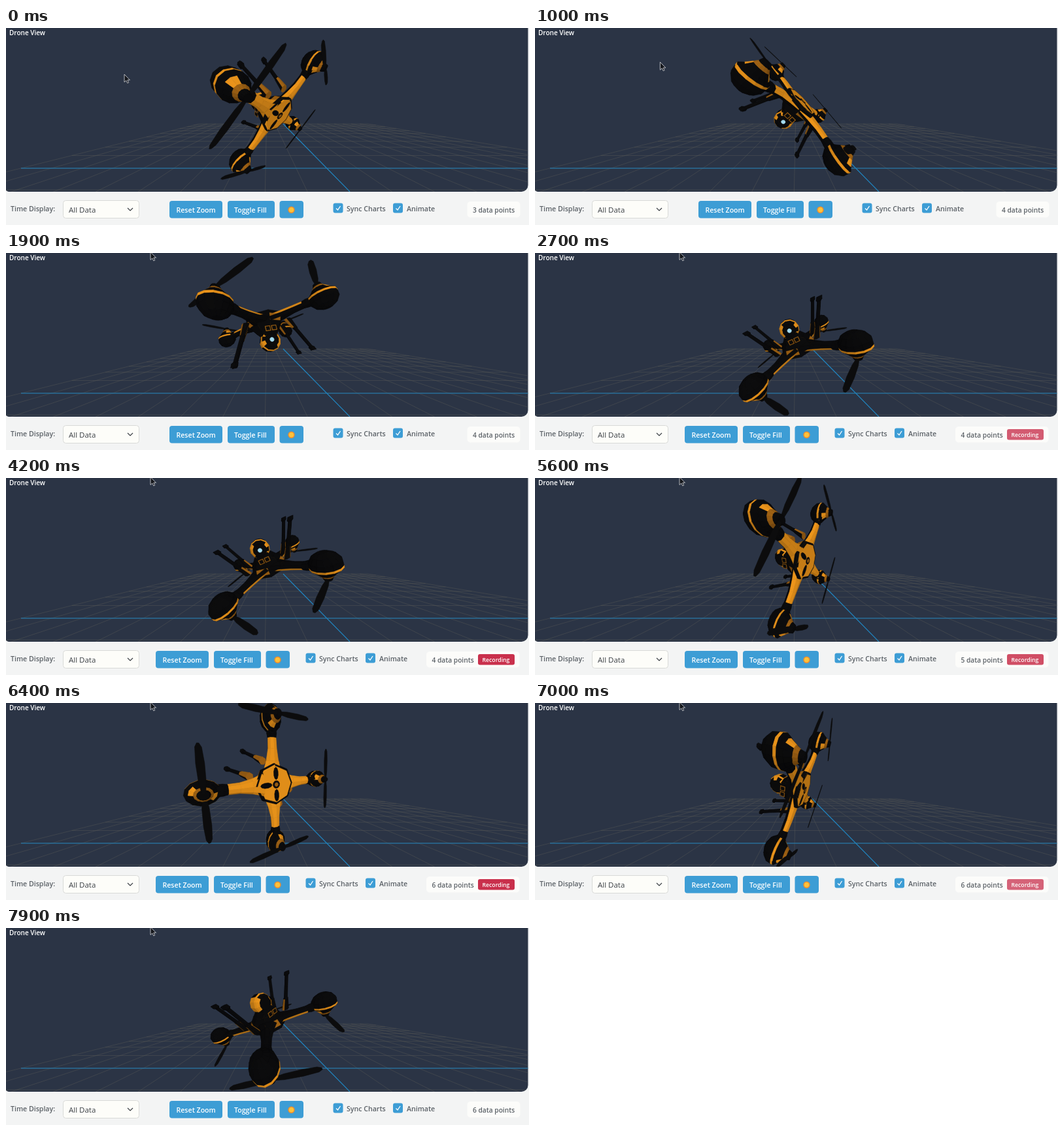
Write an HTML page with a canvas that moves like this. It is 800 px wide and 302 px high and loops after 8000 ms.

```html
<!DOCTYPE html>
<html lang="en">
<head>
<meta charset="utf-8">
<title>Drone View</title>
<style>
  html, body { margin: 0; width: 100%; height: 100%; overflow: hidden; background: #f3f4f4; }
  svg, canvas { position: absolute; left: 0; top: 0; width: 800px; height: 302px; display: block; }
  text { font-family: "Open Sans", "Noto Sans", sans-serif; font-size: 10.6px; font-weight: 600; fill: #5b6167; }
  .bold { fill: #fff; }
  .button { fill: #3d9dd5; }
  .tick { fill: none; stroke: #fff; stroke-width: 1.3; }
</style>
</head>
<body>
<svg viewBox="0 0 800 302">
  <defs>
    <clipPath id="view"><path d="M0 0H798.500V241a10 10 0 0 1-10 10H4a8 8 0 0 1-4-2z"/></clipPath>
  </defs>
  <rect width="800" height="302" fill="#f3f4f4"/>
  <g clip-path="url(#view)">
    <rect width="800" height="252" fill="#2b3445"/>
    <path id="grid" fill="none" stroke="#5d5c58" stroke-width=".8" opacity=".5"/>
    <path d="M23 215H799M424 147L526 251" fill="none" stroke="#1f82bd" stroke-width="1.2"/>
  </g>
  <text class="bold" x="5" y="10.5" style="font-size:10px">Drone View</text>

  <text x="7" y="281">Time Display:</text>
  <rect x="87.5" y="264.5" width="116" height="27" rx="4" fill="#fdfdf9" stroke="#d9dad8"/>
  <text x="96" y="282.5" style="font-size:11.5px;font-weight:500;fill:#3c4146">All Data</text>
  <path d="M186 276l4 4 4-4" fill="none" stroke="#3c4146" stroke-width="1.2"/>

  <g id="buttons">
    <rect class="button" x="250" y="265" width="81" height="26.500" rx="4"/>
    <text class="bold" x="260.500" y="282.500">Reset Zoom</text>
    <rect class="button" x="339" y="265" width="72" height="26.500" rx="4"/>
    <text class="bold" x="349" y="282.500">Toggle Fill</text>
    <rect class="button" x="418.500" y="265" width="36.500" height="26.500" rx="4"/>
    <circle cx="436.500" cy="278.800" r="4.500" fill="#ffc23a" stroke="#f08c2e" stroke-width="1.400"/>
  </g>
  <g id="checks">
    <rect class="button" x="500.500" y="268.500" width="15" height="15" rx="3"/>
    <path class="tick" d="M505 276.500l2.500 2.500 4-6"/>
    <text x="521" y="280.500">Sync Charts</text>
    <rect class="button" x="592" y="268.500" width="15" height="15" rx="3"/>
    <path class="tick" d="M596.500 276.500l2.500 2.500 4-6"/>
    <text x="613" y="280.500">Animate</text>
  </g>
  <rect id="box" y="266" height="24.500" rx="5" fill="#fcfcfa"/>
  <text id="count" y="282.500" style="font-size:10.2px"></text>
  <g id="badge">
    <rect x="722" y="270" width="56" height="16.500" rx="3" fill="#c9304c"/>
    <text class="bold" x="728.500" y="281.500" style="font-size:8.7px">Recording</text>
  </g>
  <path id="pointer" d="M0 0V12L2.800 9.500 4.800 13.500 6.700 12.600 4.800 8.800H8.500Z"
        fill="#15171c" stroke="#d8dbe0" stroke-width=".8"/>
</svg>
<canvas id="drone"></canvas>

<script>
const $ = id => document.getElementById(id);
const TAU = Math.PI * 2, LOOP = 8000, CAMERA = 200, REACH = 98;
const ORANGE = [238, 150, 27], BLACK = [12, 12, 13], TRIM = [160, 98, 20], GLINT = [165, 220, 240];

const combine = (a, b, k) => a.map((v, i) => v + b[i] * k);
const dot = (a, b) => a.reduce((s, v, i) => s + v * b[i], 0);
const cross = (a, b) => [a[1] * b[2] - a[2] * b[1], a[2] * b[0] - a[0] * b[2], a[0] * b[1] - a[1] * b[0]];
const unit = a => a.map(v => v / (Math.hypot(...a) || 1));
const ease = x => { x = Math.min(1, Math.max(0, x)); return x * x * (3 - 2 * x); };

// ---- floor grid ----
function floorPath() {
  const vx = 399, vy = 121, q0 = 94, cx = 490.7, half = 468;
  const atX = (x, q) => vx + (x - vx) * q / q0;
  let d = '';
  for (let k = -10; k <= 10; k++) {
    const x = cx + half * k / 10;
    d += `M${atX(x, 26)} ${vy + 26}L${atX(x, 131)} ${vy + 131}`;
    const depth = 1 + .2615 * k;
    if (depth < .7) continue;
    const q = q0 / depth;
    d += `M${atX(cx - half, q)} ${vy + q}L${atX(cx + half, q)} ${vy + q}`;
  }
  return d;
}
$('grid').setAttribute('d', floorPath());

// ---- drone mesh ----
const faces = [];
const UP = [0, 0, 1];

function frame(angle) {
  const out = [Math.cos(angle), Math.sin(angle), 0];
  const side = [-out[1], out[0], 0];
  const at = (r, t, c) => [out[0] * r + side[0] * t, out[1] * r + side[1] * t, c];
  return { out, side, at };
}

// Rings are [centre, radius along e1, radius along e2].
function loft(rings, e1, e2, sides, paint) {
  const loops = rings.map(([p, r1, r2 = r1]) => Array.from({ length: sides }, (_, j) => {
    const a = TAU * j / sides;
    return combine(combine(p, e1, r1 * Math.cos(a)), e2, r2 * Math.sin(a));
  }));
  for (let i = 0; i < loops.length - 1; i++)
    for (let j = 0; j < sides; j++) {
      const k = (j + 1) % sides;
      faces.push({ pts: [loops[i][j], loops[i][k], loops[i + 1][k], loops[i + 1][j]], color: paint(i, j), bias: 0 });
    }
  faces.push({ pts: loops[loops.length - 1], color: paint(loops.length - 2, 0), bias: 0 });
  faces.push({ pts: [...loops[0]].reverse(), color: paint(0, 0), bias: 0 });
}

const decal = (pts, color, bias = 4, extra = {}) => faces.push({ pts, color, bias, ...extra });
const disc = (place, r1, r2 = r1, n = 10, from = 0) => Array.from({ length: n }, (_, j) =>
  place(r1 * Math.cos(from + TAU * j / n), r2 * Math.sin(from + TAU * j / n)));

function addArm(index) {
  const { out, side, at } = frame(index * TAU / 4);
  loft([[at(18, 0, -1), 17, 7], [at(36, 0, 0), 11, 7], [at(54, 0, 1), 7.5, 6], [at(70, 0, 1), 7, 5.5],
    [at(76, 0, 1), 8, 6.5], [at(88, 0, 0), 8, 7]],
    side, UP, 8, (i, j) => j < 4 && i < 3 ? ORANGE : BLACK);

  // Motor pod: a dark bowl with a trim line, under a striped cone.
  const bowl = [[-17, 5], [-13, 11], [-6, 15], [1, 15.5], [4, 15.5], [8, 12], [14, 8], [18, 5.5], [23, 4]];
  loft(bowl.map(([c, r]) => [at(REACH, 0, c), r * 1.25, r]), out, side, 14,
    (i, j) => i === 3 || i === 5 && j % 7 < 2 ? ORANGE : i === 6 ? TRIM : BLACK);

  const blade = [[2, 1.8], [14, 3.5], [34, 4], [50, 3], [54, 1]];
  for (const dir of [1, -1]) {
    const edge = s => blade.map(([len, wide]) => at(REACH + wide * s, len * dir, 22));
    decal([...edge(1), ...edge(-1).reverse()], BLACK, 2, { double: true });
  }
  decal(disc((x, y) => at(17 + x, y, 9), 9.5, 4), BLACK, 9);
}

function addBody() {
  const { out, side, at } = frame(TAU / 8);
  loft([[at(5, 0, -28), 13], [at(3, 0, -18), 21], [at(0, 0, -8), 28], [at(0, 0, 2), 32], [at(0, 0, 6), 32], [at(0, 0, 8), 31]],
    out, side, 8, (i, j) => i === 2 && j % 2 ? TRIM : BLACK);
  decal(disc((x, y) => at(x, y, 8.5), 28, 28, 8), ORANGE, 6);
  decal(disc((x, y) => at(x, y, 9), 6), BLACK, 9);
  decal(disc((x, y) => at(x, y, 9.5), 3), TRIM, 10);

  const square = (s, size, r) => disc((x, y) => at(r, s + x, -20 + y), size, size, 4, TAU / 8);
  for (const s of [-5, 5]) {
    decal(square(s, 5.5, 24), TRIM, 6);
    decal(square(s, 3.8, 24.2), BLACK, 7);
  }

  const onSide = j => (j + 1) % 6 < 3;
  loft([[at(-9, 0, -36), 11], [at(-5, 0, -36), 15.5], [at(8, 0, -36), 16.5], [at(11, 0, -36), 15], [at(15, 0, -36), 11]],
    side, UP, 12, (i, j) => i === 2 || i > 0 && onSide(j) && j ? ORANGE : BLACK);
  decal(disc((x, y) => at(15.2, x, -36 + y), 10.5), BLACK, 7);
  decal(disc((x, y) => at(15.5, x, -36 + y), 3.4), GLINT, 8, { glint: true });

  for (const f of [-1, 1])
    for (const s of [-1, 1]) {
      const along = k => at(f * (16 + 6 * k), s * (36 + 24 * k), -6 - 58 * k);
      loft([[along(0), 6], [along(.3), 4], [along(.34), 3], [along(.9), 2.6], [along(.93), 4.5], [along(1), 4]],
        side, out, 7, (i, j) => i === 0 && j % 3 === 0 ? TRIM : BLACK);
    }
}
for (let i = 0; i < 4; i++) addArm(i);
addBody();

// ---- poses: time, centre, scale, then two neighbouring arm directions ----
const poses = [
  [0, 413, 130, .95, [-.59, .80, -.04], [-.40, -.25, .88]],
  [1900, 396, 106, .86, [.825, -.36, .43], [-.52, -.20, .83]],
  [2700, 402, 142, .82, [-.58, .56, .59], [.71, -.03, .70]],
  [4200, 401, 134, .82, [-.59, .55, .59], [.71, -.02, .70]],
  [4900, 411, 127, .9, [-.35, .62, .70], [.20, -.66, .72]],
  [6400, 409, 124, .96, [.04, .98, -.14], [-.85, .07, .50]],
  [7900, 400, 143, .85, [-.03, .47, .88], [.93, -.30, .20]]
].map(([time, x, y, scale, a, b]) => ({ time, place: [x, y, scale], turn: quaternion(a, b) }));

function quaternion(a, b) {
  const u = unit(a), n = unit(cross(a, b)), w = cross(n, u);
  const part = (x, y, z) => Math.sqrt(Math.max(0, 1 + x * u[0] + y * w[1] + z * n[2])) / 2;
  const sign = v => v < 0 ? -1 : 1;
  return unit([part(1, 1, 1), part(1, -1, -1) * sign(w[2] - n[1]),
    part(-1, 1, -1) * sign(n[0] - u[2]), part(-1, -1, 1) * sign(u[1] - w[0])]);
}

function slerp(p, q, k) {
  let c = dot(p, q);
  if (c < 0) { q = q.map(v => -v); c = -c; }
  if (c > .9995) return unit(p.map((v, i) => v + (q[i] - v) * k));
  const a = Math.acos(c);
  return p.map((v, i) => (v * Math.sin((1 - k) * a) + q[i] * Math.sin(k * a)) / Math.sin(a));
}

function poseAt(t) {
  let i = 0;
  while (i < poses.length - 2 && t >= poses[i + 1].time) i++;
  const a = poses[i], b = poses[i + 1];
  const k = Math.min(1, (t - a.time) / (b.time - a.time));
  return { place: a.place.map((v, j) => v + (b.place[j] - v) * k), turn: slerp(a.turn, b.turn, k) };
}

// ---- rendering ----
const canvas = $('drone'), ctx = canvas.getContext('2d');
const ratio = window.devicePixelRatio || 1;
canvas.width = 800 * ratio;
canvas.height = 302 * ratio;
const LIGHT = unit([.1, -.3, .95]);

function drawDrone(t) {
  const { place: [cx, cy, scale], turn: [qw, ...qv] } = poseAt(t);
  const rotate = p => combine(p, cross(qv, combine(cross(qv, p), p, qw)), 2);
  const project = ([x, y, z]) => {
    const s = scale * CAMERA / (CAMERA - Math.min(z, 150));
    return [cx + x * s, cy + y * s];
  };
  const showGlint = rotate([Math.SQRT1_2, Math.SQRT1_2, 0])[2] > .89;
  const visible = [];
  for (const face of faces) {
    if (face.glint && !showGlint) continue;
    const pts = face.pts.map(rotate), flat = pts.map(project);
    const area = flat.reduce((s, [x, y], i) => {
      const [nx, ny] = flat[(i + 1) % flat.length];
      return s + x * ny - nx * y;
    }, 0);
    if (area <= 0 && !face.double) continue;
    const normal = unit(cross(combine(pts[1], pts[0], -1), combine(pts[2], pts[0], -1)));
    const lit = face.glint || face.double ? 1 : .66 + .34 * Math.max(0, dot(normal, LIGHT));
    // Depth is the mean distance from the camera.
    const depth = pts.reduce((s, [x, y, z]) => s + Math.hypot(x, y, CAMERA - z), 0) / pts.length - face.bias;
    visible.push({ flat, depth, fill: `rgb(${face.color.map(v => Math.round(v * lit))})` });
  }
  visible.sort((a, b) => b.depth - a.depth);

  ctx.setTransform(ratio, 0, 0, ratio, 0, 0);
  ctx.clearRect(0, 0, 800, 302);
  ctx.save();
  ctx.beginPath();
  ctx.rect(0, 0, 798.5, 251);
  ctx.clip();
  ctx.lineWidth = .6;
  ctx.lineJoin = 'round';
  for (const { flat, fill } of visible) {
    ctx.beginPath();
    flat.forEach(([x, y]) => ctx.lineTo(x, y));
    ctx.closePath();
    ctx.fillStyle = ctx.strokeStyle = fill;
    ctx.fill();
    ctx.stroke();
  }
  ctx.restore();
}

function drawControls(t) {
  const recording = t >= 2400 && t < 4500 || t >= 5600 && t < 7100;
  const points = 3 + [900, 4500, 6000].filter(at => t >= at).length;
  $('buttons').setAttribute('transform', `translate(${recording ? -21 : 0})`);
  $('checks').setAttribute('transform', `translate(${recording ? -42 : 0})`);
  $('box').setAttribute('x', recording ? 643 : 705.5);
  $('box').setAttribute('width', recording ? 142.5 : 81);
  $('count').setAttribute('x', recording ? 651.5 : 714);
  $('count').textContent = `${points} data points`;
  $('badge').setAttribute('visibility', recording ? 'visible' : 'hidden');
  $('badge').setAttribute('opacity', .87 + .13 * Math.cos(TAU * (t - 4200) / 1100));
  const k = ease((t - 800) / 600);
  $('pointer').setAttribute('transform', `translate(${181 + 40 * k} ${71 - 72.5 * k})`);
}

function render() {
  const t = Math.floor(performance.now() % LOOP / 100) * 100;
  drawDrone(t);
  drawControls(t);
  requestAnimationFrame(render);
}
render();
</script>
</body>
</html>
```
